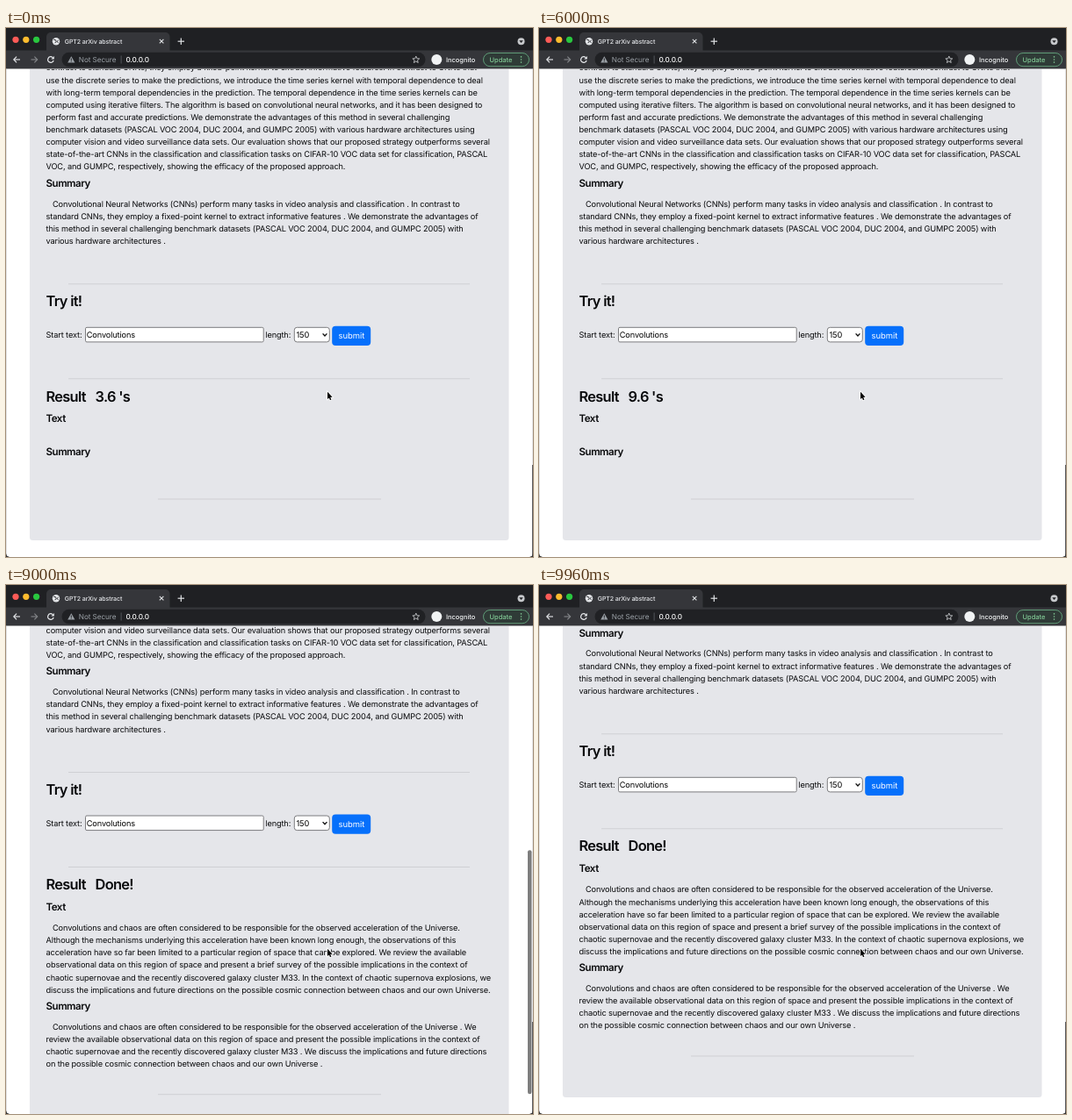
Write an HTML page with a canvas that moves like this. It is 600 px wide and 603 px high and loops after 10 s.

```html
<!DOCTYPE html>
<html lang="en">
<head>
<meta charset="utf-8">
<title>Abstract generator</title>
<style>
  html, body { margin: 0; width: 100%; height: 100%; overflow: hidden; background: #fff; }
  canvas { display: block; width: 600px; height: 603px; }
</style>
</head>
<body>
<canvas id="stage" width="600" height="603"></canvas>
<script>
const ctx = document.getElementById('stage').getContext('2d');
const LOOP = 10000, DONE_AT = 7960, SCROLL_AT = 8840, PEAK_AT = 9120;
const GROWTH = 122, OVERSHOOT = 6, LINE = 14.11, LEFT = 45.5;

// weight, size, tracking
const BODY = [400, 9.22, -0.13];
const HEADING = [600, 16.4, -0.7];
const SUBHEAD = [600, 11.6, -0.5];
const TAB = [500, 7.06, -0.12];
const ADDRESS = [400, 8.2, -0.07];
const CHIP = [500, 7.5, -0.03];

const firstText = [
  'contrast to standard CNNs, they employ a fixed-point kernel to extract informative features. In contrast to CNNs that',
  'use the discrete series to make the predictions, we introduce the time series kernel with temporal dependence to deal',
  'with long-term temporal dependencies in the prediction. The temporal dependence in the time series kernels can be',
  'computed using iterative filters. The algorithm is based on convolutional neural networks, and it has been designed to',
  'perform fast and accurate predictions. We demonstrate the advantages of this method in several challenging',
  'benchmark datasets (PASCAL VOC 2004, DUC 2004, and GUMPC 2005) with various hardware architectures using',
  'computer vision and video surveillance data sets. Our evaluation shows that our proposed strategy outperforms several',
  'state-of-the-art CNNs in the classification and classification tasks on CIFAR-10 VOC data set for classification, PASCAL',
  'VOC, and GUMPC, respectively, showing the efficacy of the proposed approach.'
];
const firstSummary = [
  'Convolutional Neural Networks (CNNs) perform many tasks in video analysis and classification . In contrast to',
  'standard CNNs, they employ a fixed-point kernel to extract informative features . We demonstrate the advantages of',
  'this method in several challenging benchmark datasets (PASCAL VOC 2004, DUC 2004, and GUMPC 2005) with',
  'various hardware architectures .'
];
const newText = [
  'Convolutions and chaos are often considered to be responsible for the observed acceleration of the Universe.',
  'Although the mechanisms underlying this acceleration have been known long enough, the observations of this',
  'acceleration have so far been limited to a particular region of space that can be explored. We review the available',
  'observational data on this region of space and present a brief survey of the possible implications in the context of',
  'chaotic supernovae and the recently discovered galaxy cluster M33. In the context of chaotic supernova explosions, we',
  'discuss the implications and future directions on the possible cosmic connection between chaos and our own Universe.'
];
const newSummary = [
  'Convolutions and chaos are often considered to be responsible for the observed acceleration of the Universe . We',
  'review the available observational data on this region of space and present the possible implications in the context of',
  'chaotic supernovae and the recently discovered galaxy cluster M33 . We discuss the implications and future directions',
  'on the possible cosmic connection between chaos and our own Universe .'
];

function text(str, x, y, [weight, size, tracking], color = '#08090b') {
  ctx.font = `${weight} ${size}px Inter, sans-serif`;
  ctx.letterSpacing = tracking + 'px';
  ctx.fontKerning = 'normal';
  ctx.textRendering = 'geometricPrecision';
  ctx.fillStyle = color;
  ctx.fillText(str, x, y);
}

function paragraph(lines, y, indent = 7.5) {
  lines.forEach((line, i) => text(line, LEFT + (i ? 0 : indent), y + i * LINE, BODY));
}

function box(x, y, w, h, radius, fill, stroke) {
  ctx.beginPath();
  ctx.roundRect(x, y, w, h, radius);
  if (fill) { ctx.fillStyle = fill; ctx.fill(); }
  if (stroke) { ctx.strokeStyle = stroke; ctx.lineWidth = 1; ctx.stroke(); }
}

function path(points, { stroke, fill, width = 1.1, close = false }) {
  ctx.beginPath();
  points.forEach(([x, y]) => ctx.lineTo(x, y));
  if (close) ctx.closePath();
  if (fill) { ctx.fillStyle = fill; ctx.fill(); }
  if (stroke) { ctx.strokeStyle = stroke; ctx.lineWidth = width; ctx.stroke(); }
}

function disc(x, y, r, fill) {
  ctx.beginPath();
  ctx.arc(x, y, r, 0, Math.PI * 2);
  ctx.fillStyle = fill;
  ctx.fill();
}

function rule(x1, x2, y) {
  ctx.fillStyle = '#cfd0d4';
  ctx.fillRect(x1, y, x2 - x1, 1);
}

function scrollOffset(t) {
  if (t < SCROLL_AT) return 0;
  const u = (t - SCROLL_AT) / (PEAK_AT - SCROLL_AT);
  if (u < 1) return (GROWTH + OVERSHOOT) * u * u * (3 - 2 * u);
  return GROWTH + OVERSHOOT * Math.exp(-(t - PEAK_AT) / 110);
}

function drawForm() {
  text('Start text:', LEFT, 353.2, BODY);
  box(90.5, 341.3, 202.7, 16.6, 1.5, '#fff', '#7b7b7e');
  text('Convolutions', 91.7, 353.2, BODY, '#000');
  text('length:', 295.3, 353.2, BODY);
  box(328.3, 341.3, 40, 16.6, 3, '#fff', '#7b7b7e');
  text('150', 330.5, 353.2, BODY, '#000');
  path([[360.6, 348.4], [363, 351], [365.4, 348.4]], { stroke: '#111', width: 1.4 });
  box(371.2, 339.7, 44, 22.3, 4, '#0670fb');
  text('submit', 378.6, 354, [400, 9.41, -0.05], '#fff');
}

function drawPage(t) {
  const done = t >= DONE_AT, extra = done ? GROWTH : 0;
  ctx.save();
  ctx.beginPath();
  ctx.rect(0, 47, 600, 556);
  ctx.clip();
  ctx.translate(0, -scrollOffset(t));

  box(27, -200, 545.5, 784 + extra, 3.5, '#e5e6ea');
  paragraph(firstText, 161.3 - 8 * LINE, 0);
  text('Summary', LEFT, 180.7, SUBHEAD);
  paragraph(firstSummary, 203.5);
  rule(71, 528, 291.3);
  text('Try it!', LEFT, 317.4, HEADING);
  drawForm();
  rule(71, 528, 399.3);

  text('Result', LEFT, 425.5, HEADING);
  const tenths = Math.floor(36 + (t + 20) / 100);
  text(done ? 'Done!' : `${(tenths / 10).toFixed(1)} 's`, 101.5, 425.5, HEADING);
  text('Text', LEFT, 449.4, SUBHEAD);
  if (done) {
    paragraph(newText, 472.4);
    text('Summary', LEFT, 562.2, SUBHEAD);
    paragraph(newSummary, 585);
  } else {
    text('Summary', LEFT, 487, SUBHEAD);
  }
  rule(173, 427, 536.5 + extra);
  ctx.restore();
}

function drawScrollbar(t) {
  const alpha = Math.min((t - 8890) / 80, (9850 - t) / 200, 1);
  if (alpha <= 0) return;
  const top = 324 + (Math.min(scrollOffset(t), GROWTH) - GROWTH) * 0.5;
  ctx.globalAlpha = alpha;
  box(594, top, 4.5, 278, 2.2, '#7d7d7d');
  ctx.globalAlpha = 1;
}

function drawTabs() {
  ctx.fillStyle = '#1f2023';
  ctx.fillRect(0, 0, 600, 27);
  ctx.fillStyle = '#35363a';
  ctx.fillRect(0, 25.5, 600, 21);
  box(46, 5, 140.5, 22, [5, 5, 0, 0], '#35363a');
  ['#fc5b57', '#fdbc2e', '#29c73f'].forEach((color, i) => disc(11 + i * 11.8, 13.3, 3.6, color));

  disc(57, 15.2, 4.2, '#e4e6e9');
  path([[54.2, 13.2], [56.5, 13.7], [57.3, 15.8], [55.6, 16.9]], { stroke: '#35363a', width: 1 });
  path([[59.8, 13.6], [58.4, 15.2], [59.4, 17]], { stroke: '#35363a', width: 0.9 });
  text('GPT2 arXiv abstract', 66.8, 17.9, TAB, '#e8eaed');
  path([[174.8, 12.8], [179.4, 17.4]], { stroke: '#e0e2e5' });
  path([[179.4, 12.8], [174.8, 17.4]], { stroke: '#e0e2e5' });
  path([[195.6, 15.2], [203, 15.2]], { stroke: '#dfe1e4', width: 1.2 });
  path([[199.3, 11.5], [199.3, 18.9]], { stroke: '#dfe1e4', width: 1.2 });
  disc(586.5, 15.2, 4, '#c6c8cb');
  path([[584.3, 14.2], [588.7, 14.2], [586.5, 17]], { fill: '#1f2023', close: true });
}

function drawArrow(x, dir, color) {
  path([[x - 3.5 * dir, 36], [x + 3.5 * dir, 36]], { stroke: color });
  path([[x + 0.4 * dir, 32.7], [x + 3.7 * dir, 36], [x + 0.4 * dir, 39.3]], { stroke: color });
}

function drawToolbar() {
  drawArrow(12.5, -1, '#e8eaed');
  drawArrow(32, 1, '#85878b');
  ctx.beginPath();
  ctx.arc(51, 36, 3.3, 0.3, 5.5);
  ctx.strokeStyle = '#e8eaed';
  ctx.lineWidth = 1.2;
  ctx.stroke();
  path([[54.8, 32], [54.8, 35.4], [51.4, 35.4]], { fill: '#e8eaed', close: true });

  box(63.5, 27.8, 414, 16.5, 8.2, '#202124');
  path([[74.3, 32.2], [78.4, 39.4], [70.2, 39.4]], { fill: '#9aa0a6', close: true });
  ctx.fillStyle = '#202124';
  ctx.fillRect(73.8, 34.5, 1, 2.4);
  ctx.fillRect(73.8, 37.5, 1, 1);
  text('Not Secure', 82.8, 39, ADDRESS, '#9aa0a6');
  ctx.fillStyle = '#5f6368';
  ctx.fillRect(130.7, 31.5, 0.8, 9);
  text('0.0.0.0', 136.4, 39, [500, 8.2, -0.1], '#fff');

  const star = Array.from({ length: 10 }, (_, i) => {
    const r = i % 2 ? 1.8 : 4.1, a = -Math.PI / 2 + i * Math.PI / 5;
    return [466.8 + r * Math.cos(a), 36.2 + r * Math.sin(a)];
  });
  path(star, { stroke: '#d5d7da', width: 0.8, close: true });
  disc(490.3, 36, 6, '#f1f3f4');
  text('Incognito', 501, 38.8, CHIP, '#f1f3f4');
  box(543.5, 28.5, 52, 15.2, 7.6, '#2f3b37', '#5f9b77');
  text('Update', 550.6, 38.8, CHIP, '#81c995');
  [32.9, 36, 39.1].forEach(y => disc(586.5, y, 0.8, '#81c995'));
}

function drawCursor() {
  const shape = [[366, 414.8], [366, 423], [367.8, 421.4], [369, 424.2], [370.4, 423.6], [369.2, 420.9], [371.6, 420.8]];
  path(shape, { stroke: '#fff', width: 1.6, close: true });
  path(shape, { fill: '#000', close: true });
}

function drawEdges() {
  ctx.fillStyle = '#c9c9cb';
  ctx.fillRect(599.4, 47, 0.6, 451);
  ctx.fillRect(0, 47, 0.6, 556);
  ctx.fillStyle = '#2b2b2d';
  ctx.fillRect(599.2, 498, 0.8, 105);
  path([[0, 599], [0, 603], [4, 603], [1.2, 601.8]], { fill: '#333', close: true });
  path([[600, 599], [600, 603], [596, 603], [598.8, 601.8]], { fill: '#333', close: true });
}

function frame() {
  const t = performance.now() % LOOP;
  ctx.fillStyle = '#fff';
  ctx.fillRect(0, 0, 600, 603);
  drawPage(t);
  drawScrollbar(t);
  drawTabs();
  drawToolbar();
  drawEdges();
  drawCursor();
  requestAnimationFrame(frame);
}
frame();
</script>
</body>
</html>
```
